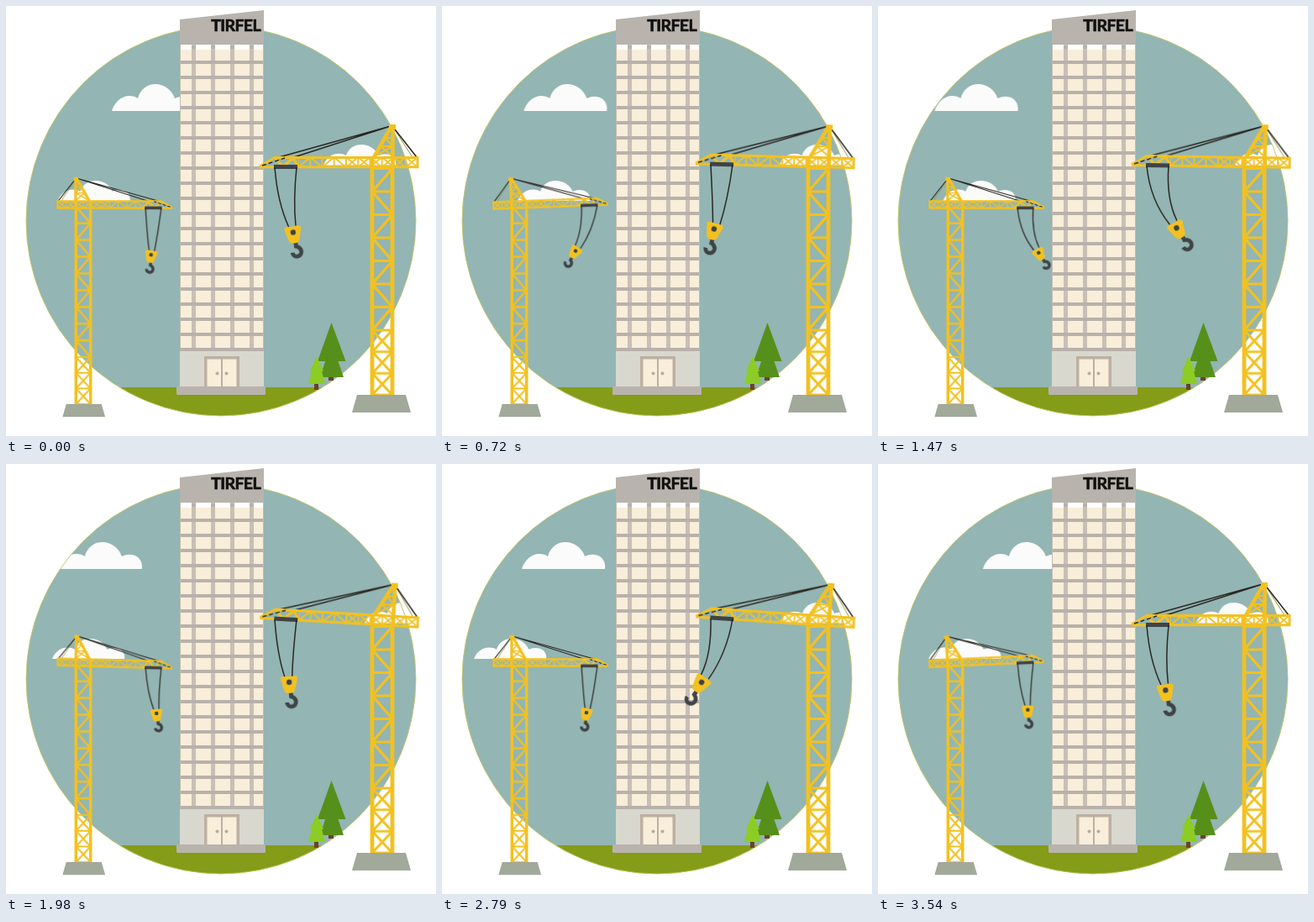
An HTML page without scripts that plays this animation: 512 px wide and 512 px high, repeating every 3570 ms.

```html
<!DOCTYPE html>
<html lang="en">
<head>
<meta charset="utf-8">
<title>Tower cranes</title>
<style>
html, body { margin: 0; width: 100%; height: 100%; overflow: hidden; background: #fff; }
svg { display: block; width: 100%; height: 100%; }

/* Cable and hook-block poses, from far west to far east */
svg {
  --cable-w3: path("M-13 0Q-12 42-26 67M13 0Q6 41-17 72");
  --cable-w2: path("M-13 0Q-11 42.5-14 70M13 0Q7 42-6 73.5");
  --cable-w1: path("M-13 0Q-10.7 42-7 71M13 0Q7.7 41 1.4 72.5");
  --cable-e1: path("M-13 0Q-10 42-.5 71M13 0Q8.4 40.5 8 70.6");
  --cable-e2: path("M-13 0Q-9.8 41.5 3.6 71M13 0Q8.9 40 12 69.5");
  --cable-e3: path("M-13 0Q-9.5 41 7.5 71M13 0Q9.3 39.7 16 68.4");
  --cable-e4: path("M-13 0Q-9 41 14.5 70M13 0Q10 39 23 65.5");
  --block-w3: translate(-26px, 76.5px) rotate(38deg);
  --block-w2: translate(-14px, 78px) rotate(22deg);
  --block-w1: translate(-4px, 78.5px) rotate(9deg);
  --block-e1: translate(4px, 79px) rotate(0deg);
  --block-e2: translate(9px, 78.5px) rotate(-7deg);
  --block-e3: translate(14px, 77px) rotate(-13deg);
  --block-e4: translate(23px, 75px) rotate(-28deg);
}

.move { animation: 3570ms cubic-bezier(.37, 0, .63, 1) infinite; }
.drift { animation: 3570ms linear infinite; }
.cable { fill: none; stroke: #2a2723; stroke-width: 1.5; }
.west .cable { stroke-width: 1.7; }
.steel { fill: none; stroke: #f3c11f; }

.cloud-a { animation-name: cloud-a; }
.cloud-b { animation-name: cloud-b; }
.cloud-c { animation-name: cloud-c; }
.east .jib { animation-name: tilt-east; }
.east .lift { animation-name: lift-east; }
.east .cable { animation-name: cable-east; }
.east .block { animation-name: block-east; }
.west .jib { animation-name: tilt-west; }
.west .lift { animation-name: lift-west; }
.west .cable { animation-name: cable-west; }
.west .block { animation-name: block-west; }

@keyframes cloud-a {
  0%, 100% { transform: translateX(126px); }
  50% { transform: translateX(55px); }
}
@keyframes cloud-b {
  0%, 100% { transform: translateX(61.5px); }
  12.6% { transform: translateX(81px); }
  20% { transform: translateX(90px); }
  25.5% { transform: translateX(94px); }
  27.7% { transform: translateX(93.5px); }
  34.5% { transform: translateX(87px); }
  41.2% { transform: translateX(77.5px); }
  55.5% { transform: translateX(55px); }
  60.5% { transform: translateX(49px); }
  68% { transform: translateX(41px); }
  75% { transform: translateX(37px); }
  78.2% { transform: translateX(38px); }
  91.6% { transform: translateX(49px); }
}
@keyframes cloud-c {
  0%, 100% { transform: translateX(378px); }
  12.6% { transform: translateX(390px); }
  27.7% { transform: translateX(413px); }
  41.2% { transform: translateX(425px); }
  48.3% { transform: translateX(428px); }
  55.5% { transform: translateX(427px); }
  67.2% { transform: translateX(417px); }
  78.2% { transform: translateX(402px); }
  90.8% { transform: translateX(384px); }
}

@keyframes tilt-east {
  0%, 29.4%, 100% { transform: rotate(0deg); }
  14% { transform: rotate(2.3deg); }
  70% { transform: rotate(4.6deg); }
}
@keyframes lift-east {
  0%, 29.4%, 100% { transform: translateY(0); }
  14% { transform: translateY(-4.8px); }
  70% { transform: translateY(-9.4px); }
}
@keyframes cable-east {
  0% { d: var(--cable-e2); animation-timing-function: cubic-bezier(.3, .2, .6, 1); }
  14% { d: var(--cable-w2); }
  40.6% { d: var(--cable-e4); }
  75.6% { d: var(--cable-w3); }
  96.1% { d: var(--cable-e3); }
  100% { d: var(--cable-e2); }
}
@keyframes block-east {
  0% { transform: var(--block-e2); animation-timing-function: cubic-bezier(.3, .2, .6, 1); }
  14% { transform: var(--block-w2); }
  40.6% { transform: var(--block-e4); }
  75.6% { transform: var(--block-w3); }
  96.1% { transform: var(--block-e3); }
  100% { transform: var(--block-e2); }
}

@keyframes tilt-west {
  0%, 12.6%, 41.2%, 78.2% { transform: rotate(0deg); }
  27.7% { transform: rotate(-4.3deg); }
  55.5% { transform: rotate(1.5deg); }
  99.2%, 100% { transform: rotate(-2.6deg); }
}
@keyframes lift-west {
  0%, 12.6%, 41.2%, 78.2% { transform: translateY(0); }
  27.7% { transform: translateY(-9px); }
  55.5% { transform: translateY(3px); }
  99.2%, 100% { transform: translateY(-5.4px); }
}
@keyframes cable-west {
  0% { d: var(--cable-w1); animation-timing-function: cubic-bezier(.3, .2, .6, 1); }
  16.2% { d: var(--cable-w3); }
  43% { d: var(--cable-e4); }
  68.6% { d: var(--cable-w2); }
  91% { d: var(--cable-e2); }
  99.2%, 100% { d: var(--cable-e1); }
}
@keyframes block-west {
  0% { transform: var(--block-w1); animation-timing-function: cubic-bezier(.3, .2, .6, 1); }
  16.2% { transform: var(--block-w3); }
  43% { transform: var(--block-e4); }
  68.6% { transform: var(--block-w2); }
  91% { transform: var(--block-e2); }
  99.2%, 100% { transform: var(--block-e1); }
}
</style>
</head>
<body>
<svg viewBox="0 0 512 512">
  <defs>
    <clipPath id="disc"><circle cx="256" cy="256" r="232"/></clipPath>

    <path id="cloud" fill="#fbfbfb" d="M0 32C3 22 11 14 21 14Q27 14 31 17C34 6 42 0 52 0S72 7 75 17Q81 14 87 15C96 16 100 24 99 32Z"/>

    <pattern id="windows" x="203" y="65" width="23" height="18" patternUnits="userSpaceOnUse">
      <rect width="23" height="18" fill="#f8eed9"/>
      <rect x="18" width="5" height="18" fill="#c8bfb6"/>
      <rect width="23" height="4" fill="#b9b1ab"/>
    </pattern>

    <pattern id="zigzag" x="-14" y="-77" width="28" height="55" patternUnits="userSpaceOnUse">
      <path class="steel" stroke-width="3.200" d="M0 0H28M0 55H28M0 27.500H28M2 0L26 27.500L2 55"/>
    </pattern>
    <pattern id="cross" x="-14" y="-77" width="28" height="25.700" patternUnits="userSpaceOnUse">
      <path class="steel" stroke-width="3" d="M0 0H28M0 25.700H28M2 0L26 25.700M26 0L2 25.700"/>
    </pattern>
    <pattern id="truss" x="-100" y="-13" width="28.400" height="12" patternUnits="userSpaceOnUse">
      <path class="steel" stroke-width="1.800" d="M0 0V12M14.200 0V12M28.400 0V12M0 12L14.200 0L28.400 12"/>
    </pattern>
    <pattern id="braced" x="-43" y="-13" width="14.200" height="12" patternUnits="userSpaceOnUse">
      <path class="steel" stroke-width="1.800" d="M0 0V12M14.200 0V12M0 0L14.200 12M0 12L14.200 0"/>
    </pattern>

    <!-- Origin: foot of the tower -->
    <g id="foot">
      <rect x="-14" y="-77" width="28" height="77" fill="url(#cross)"/>
      <path fill="#a0a99a" d="M-30 0H28L34 21H-36Z"/>
    </g>

    <!-- Origin: top of the tower, boom pointing left -->
    <g id="boom">
      <path fill="none" stroke="#8f9130" d="M12-50L36-13"/>
      <path class="cable" d="M10-50L-130-11M10-50L-105-13M12-50L41-13"/>
      <path class="steel" stroke-width="3" d="M-146-2L-128-12.500H42V-1.200H-146M-128-12L-118-2L-106-12L-100-2"/>
      <path class="cable" stroke-dasharray="5 3" d="M-143-3L-116-12"/>
      <rect x="-100" y="-13" width="57" height="12" fill="url(#truss)"/>
      <rect x="-43" y="-13" width="85" height="12" fill="url(#braced)"/>
      <path class="steel" stroke-width="4.500" d="M11-50L-10-13M12.500-51V-1M-12-13V-1"/>
      <path class="steel" stroke-width="2" d="M3-36H12M-3-26H12L-9-14M-2-26L12-14M4-36L12-26"/>
      <rect x="8" y="-52" width="8" height="6" fill="#f3c11f"/>
      <rect x="-129" y="-4" width="28" height="5" fill="#404346"/>
    </g>

    <!-- Origin: middle of the block -->
    <g id="block">
      <path fill="none" stroke="#404346" stroke-width="4.800" d="M1.500 9V16Q7 18 7 22.500A5.200 5.200 0 0 1-3.700 23"/>
      <path fill="#f3c11f" d="M-8-8H8Q10-8 10-5L6.500 8Q5.500 12 2 12H-2Q-5.500 12-6.500 8L-10-5Q-10-8-8-8Z"/>
      <circle cy="-1" r="3.200" fill="#404346"/>
    </g>
  </defs>

  <g clip-path="url(#disc)">
    <rect width="512" height="512" fill="#93b5b3"/>
    <rect y="454" width="512" height="58" fill="#849c18"/>
    <g class="drift cloud-a"><use href="#cloud" y="93"/></g>
    <g class="drift cloud-b"><use href="#cloud" transform="translate(0 208) scale(.87 .75)"/></g>
    <g class="drift cloud-c"><use href="#cloud" transform="translate(0 165) scale(.87 .77)"/></g>
  </g>
  <circle cx="256" cy="256" r="232" fill="none" stroke="#c3c766" stroke-width=".9"/>

  <g id="trees">
    <path fill="#6b4322" d="M384 440H390V446H384ZM367 448H372V457H367Z"/>
    <path fill="#578f1b" d="M387.500 377L404.500 423H371ZM387.500 400L402 442H374Z"/>
    <path fill="#8ccc25" d="M370 417L378 435H376L380 450H360L364 435H362Z"/>
  </g>

  <g id="building">
    <path fill="#b9b3ad" d="M207 16L307 5V46H207Z"/>
    <text x="303" y="30" text-anchor="end" font-family="Lato, Roboto, sans-serif" font-weight="700" font-size="19.500" letter-spacing="-.6" fill="#111" stroke="#111" stroke-width=".7">TIRFEL</text>
    <rect x="207" y="46" width="100" height="363" fill="url(#windows)"/>
    <path fill="#fff" d="M208 46H221V52H208ZM226 46H244V52H226ZM249 46H267V52H249ZM272 46H290V52H272ZM295 46H306V52H295Z"/>
    <path fill="none" stroke="#c2bab2" d="M207.500 46V409M306.500 46V409"/>
    <rect x="207" y="408" width="100" height="46" fill="#d8d8ce"/>
    <rect x="207" y="408" width="100" height="3" fill="#b9b1ab"/>
    <rect x="236" y="417" width="42" height="36" fill="#bcb0a2"/>
    <path fill="#f8eed9" d="M239.500 420.500H256V453H239.500ZM258 420.500H274.500V453H258Z"/>
    <g fill="#b5aca2"><circle cx="251.500" cy="437.500" r="2"/><circle cx="262.500" cy="437.500" r="2"/></g>
    <rect x="203" y="453" width="106" height="10" rx="1.500" fill="#b9b3ae"/>
  </g>

  <g class="west">
    <g transform="translate(92 474) scale(-.725 .725)">
      <rect x="-14" y="-321" width="28" height="244" fill="url(#zigzag)"/>
      <path class="steel" stroke-width="4.800" d="M-12-321V0M12-321V0"/>
      <use href="#foot"/>
    </g>
    <g transform="translate(92 241.500)">
      <g class="move jib"><use href="#boom" transform="scale(-.725 .725)"/></g>
    </g>
    <g transform="translate(175.500 240.500) scale(.72)">
      <g class="move lift">
        <path class="move cable"/>
        <g class="move block"><use href="#block"/></g>
      </g>
    </g>
  </g>

  <g class="east">
    <g transform="translate(448 463)">
      <rect x="-14" y="-270" width="28" height="193" fill="url(#zigzag)"/>
      <path class="steel" stroke-width="4.800" d="M-12-270V0M12-270V0"/>
      <use href="#foot"/>
    </g>
    <g transform="translate(448 193)">
      <g class="move jib"><use href="#boom"/></g>
    </g>
    <g transform="translate(333 192)">
      <g class="move lift">
        <path class="move cable"/>
        <g class="move block"><use href="#block"/></g>
      </g>
    </g>
  </g>
</svg>
</body>
</html>
```
